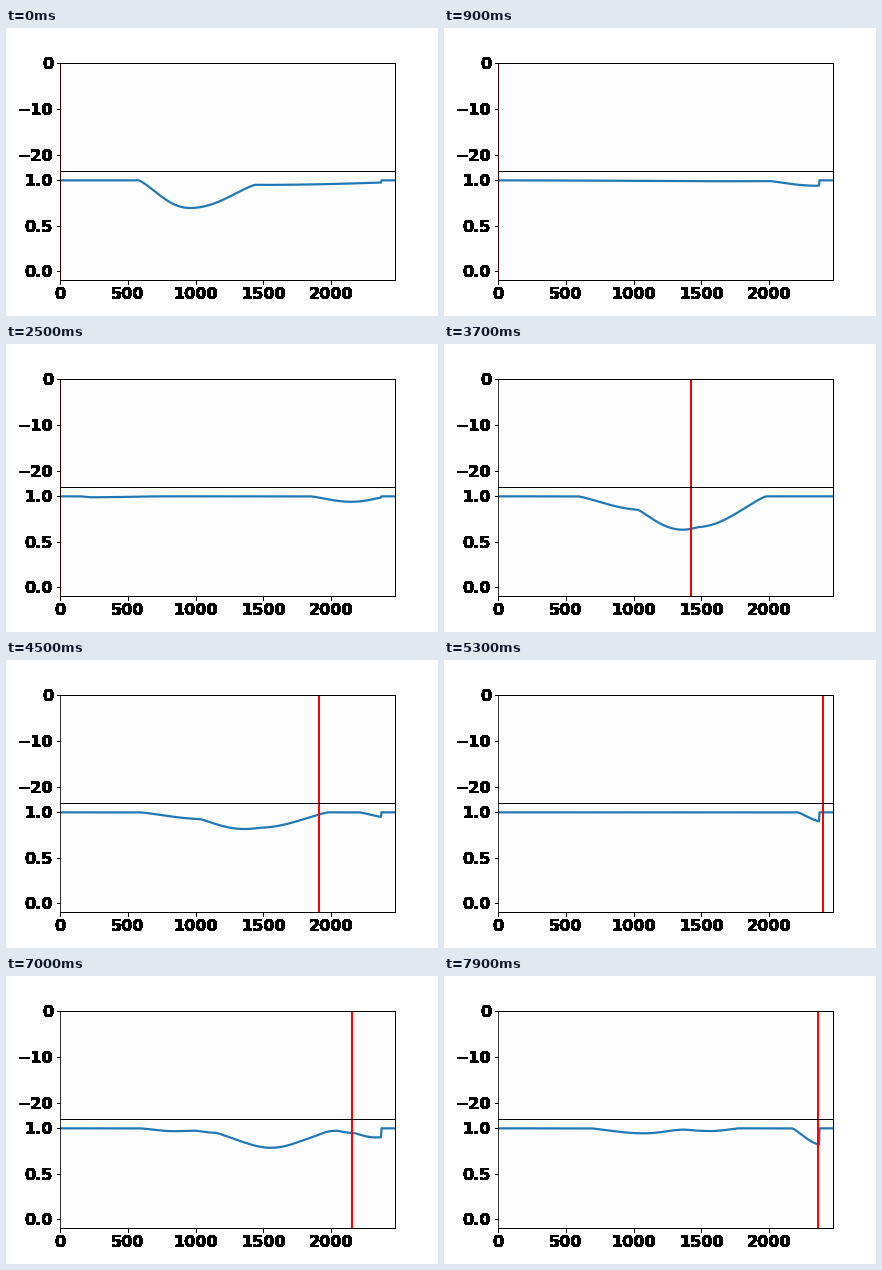
Write a matplotlib script that moves like this. It is 432 px wide and 288 px high and loops after 8000 ms.

```python
import matplotlib.pyplot as plt
import numpy as np
from matplotlib.animation import FuncAnimation

plt.rcParams.update({
    "font.family": "DejaVu Sans",
    "font.weight": "bold",
    "font.size": 16,
})

FRAMES, STEP_MS = 80, 100
X_MAX, X_END = 2470, 2368
x = np.arange(0, X_MAX + 1, 4)


def bump(center, left, right, depth):
    """Rounded dip that reaches zero at center - left and center + right."""
    t = (x - center) / np.where(x < center, left, right)
    return depth * np.cos(np.pi / 2 * np.clip(t, -1, 1)) ** 1.25


def profile(*bumps):
    """Level 1.0 lowered by bumps (in hundredths), back to 1.0 at X_END."""
    dip = sum(bump(*b) for b in bumps)
    return np.where(x <= X_END, 1 - dip / 100, 1.0)


# Key poses of the curve; those between are blends
POSES = {
    0: profile((940, 360, 500, 28), (1500, 900, 1400, 5)),
    9: profile((1800, 1600, 500, 1), (2350, 350, 100, 6)),
    25: profile((230, 80, 500, 1), (2150, 300, 270, 6)),
    37: profile((1080, 490, 400, 15), (1460, 430, 520, 34)),
    53: profile((2420, 210, 100, 11)),
    61: profile((780, 190, 200, 4), (1180, 180, 300, 5),
                (1550, 400, 500, 40), (2180, 220, 220, 10.5)),
    79: profile((1080, 400, 300, 5.5), (1570, 300, 200, 3),
                (2400, 230, 100, 18.5)),
}
KEYS = list(POSES)

# The marker rests at 0, then sweeps between these positions
SWEEP_TIMES = [27, 37, 53, 61, 75, 79]
SWEEP_STOPS = [2430, 1425, 2395, 1595, 2465, 2360]


def curve_at(i):
    k = min(np.searchsorted(KEYS, i, side="right"), len(KEYS) - 1)
    a, b = KEYS[k - 1], KEYS[k]
    t = (i - a) / (b - a)
    return (1 - t) * POSES[a] + t * POSES[b]


def marker_at(i):
    return np.interp(i, SWEEP_TIMES, SWEEP_STOPS) if i >= SWEEP_TIMES[0] else 0


def harden(img, dpi):
    """Turn soft edges into solid ones."""
    img[..., 3] = img[..., 3] > .05
    return img, 0, 0


fig = plt.figure(figsize=(6, 4), dpi=72, facecolor="white")


def panel(bottom, ylim, yticks, xticks):
    ax = fig.add_axes([.125, bottom, .775, .3775], facecolor="#fdfdfd")
    ax.set(xlim=(0, X_MAX), ylim=ylim, xticks=xticks, yticks=yticks)
    edges = [ax.spines[side] for side in ("top", "right", "bottom")]
    for part in [ax.xaxis, ax.yaxis, *edges]:
        part.set_agg_filter(harden)
    return ax


upper = panel(.5025, (-23.6, 0), [-20, -10, 0], [])
lower = panel(.125, (-.1, 1.1), [0, .5, 1], range(0, 2001, 500))

curve, = lower.plot(x, POSES[0], color="C0", lw=2.2)
markers = [ax.axvline(0, color="red", lw=2) for ax in (upper, lower)]


def update(i):
    curve.set_ydata(curve_at(i))
    for line in markers:
        line.set_xdata([marker_at(i)] * 2)
    return [curve, *markers]


anim = FuncAnimation(fig, update, frames=FRAMES, interval=STEP_MS,
                     repeat=True, repeat_delay=0, blit=False)
plt.show()
```
